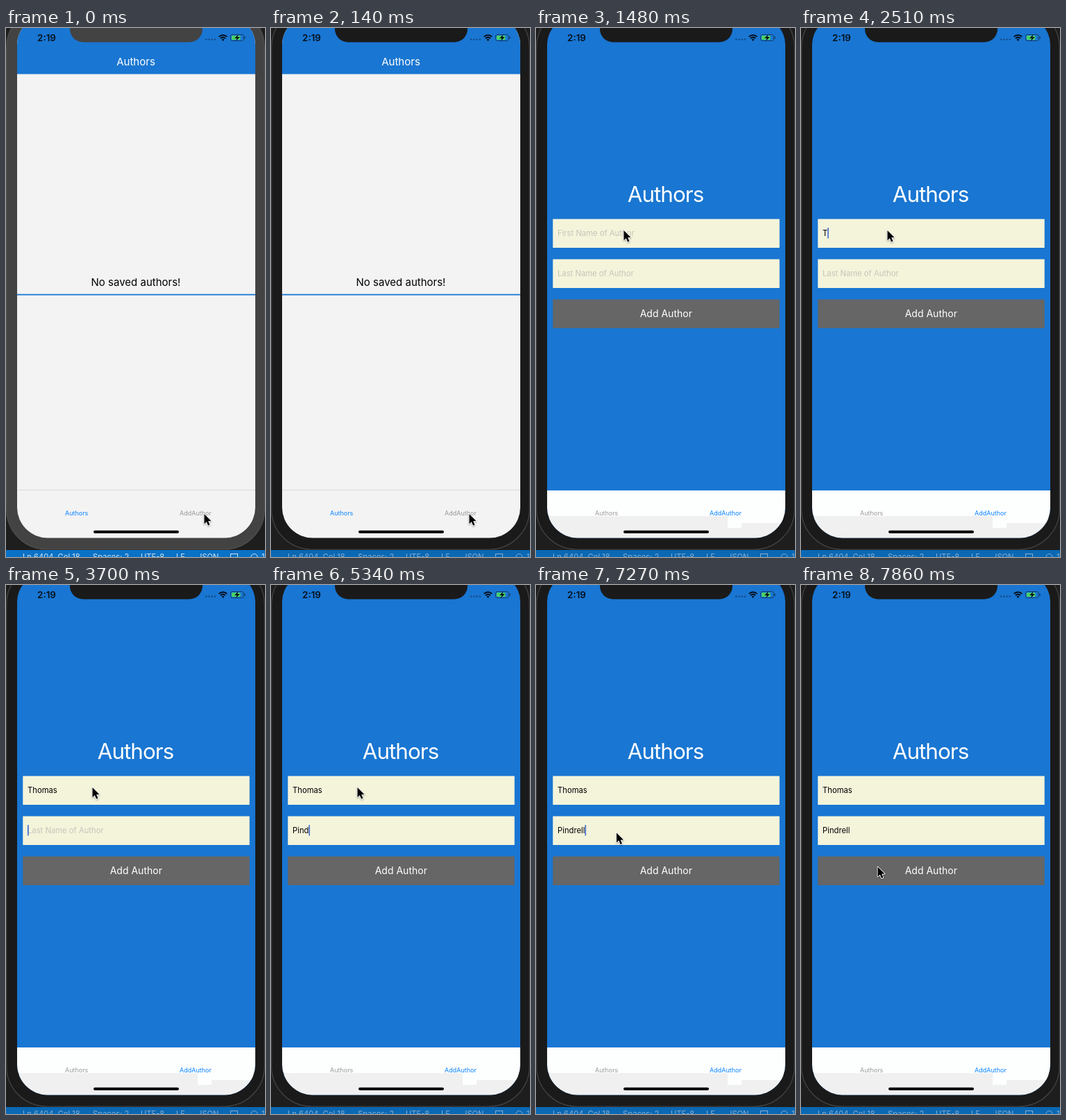
An HTML page with a canvas for the animation above (8000 ms loop, 373x763 px).

```html
<!DOCTYPE html>
<html lang="en">
<head>
<meta charset="utf-8">
<title>Authors app</title>
<style>
  html, body { margin: 0; width: 100%; height: 100%; overflow: hidden; background: #1e1e1e; }
  canvas { display: block; width: 373px; height: 763px; }
</style>
</head>
<body>
<canvas id="stage"></canvas>
<script>
const W = 373, H = 763, LOOP = 8000, TICK = 148.4;
const BLUE = '#1976d2', LINK = '#0a84ff', PAPER = '#f3f3f3';
const FAMILY = 'Inter, "Open Sans", sans-serif';

const canvas = document.getElementById('stage');
const ctx = canvas.getContext('2d');
const dpr = window.devicePixelRatio || 1;
canvas.width = W * dpr;
canvas.height = H * dpr;

const FIRST = { text: 'Thomas', hint: 'First Name of Author', top: 275.5, keys: [2510, 2810, 2960, 3110, 3250, 3400] };
const LAST = { text: 'Pindrell', hint: 'Last Name of Author', top: 333.5, keys: [4150, 4600, 4740, 5340, 5490, 5790, 5940, 6080] };

// Pointer stops: time, x, y
const STOPS = [
  [0, 285, 700.5], [290, 285, 700.5], [1180, 147, 319], [1340, 147, 319], [1480, 126, 291.5],
  [1620, 124, 291.5], [6680, 124, 291.5], [7720, 110, 399], [7860, 110, 406], [LOOP, 110, 406]
];

function rect(x, y, w, h, color) {
  ctx.fillStyle = color;
  ctx.fillRect(x, y, w, h);
}

function rounded(x, y, w, h, r) {
  ctx.beginPath();
  ctx.roundRect(x, y, w, h, r);
}

function label(text, x, y, size, color, { align = 'center', weight = 400, spacing = 0 } = {}) {
  ctx.font = `${weight} ${size}px ${FAMILY}`;
  ctx.letterSpacing = `${spacing}px`;
  ctx.textAlign = align;
  ctx.fillStyle = color;
  ctx.fillText(text, x, y);
  const width = ctx.measureText(text).width;
  ctx.letterSpacing = '0px';
  return width;
}

function drawEditorBar(focused) {
  rect(0, 0, W, H, '#1e1e1e');
  rect(0, 753, W, 10, focused ? '#0a68b4' : '#0972c6');
  const ink = focused ? '#86add0' : '#d3e4f3';
  const items = [['Ln 6404, Col 18', 24], ['Spaces: 2', 125], ['UTF-8', 194], ['LF', 245], ['JSON', 276], ['1', 368]];
  for (const [text, x] of items) label(text, x, 766.5, 11.2, ink, { align: 'left' });
  ctx.strokeStyle = ink;
  ctx.lineWidth = 1;
  ctx.strokeRect(323.5, 758.5, 10, 8);
  ctx.beginPath();
  ctx.arc(357.5, 763, 4.5, Math.PI, 0);
  ctx.stroke();
}

function drawShell(color, edge) {
  rounded(0.7, -30, W - 1.4, 782, 58);
  ctx.fillStyle = color;
  ctx.fill();
  ctx.strokeStyle = edge;
  ctx.lineWidth = 1.2;
  ctx.stroke();
}

function drawNotch(color) {
  rounded(92, -30, 191, 50.5, [0, 0, 19, 19]);
  ctx.fillStyle = color;
  ctx.fill();
}

function drawStatus() {
  label('2:19', 58.5, 19, 13.4, '#06101c', { weight: 600 });
  ctx.fillStyle = '#124f8f';
  for (let i = 0; i < 4; i++) {
    ctx.beginPath();
    ctx.arc(288.3 + i * 4.2, 16.5, 1.3, 0, 7);
    ctx.fill();
  }

  // Wi-Fi fan
  ctx.strokeStyle = ctx.fillStyle = '#050b14';
  ctx.lineWidth = 1.9;
  for (const r of [8.2, 5]) {
    ctx.beginPath();
    ctx.arc(312.5, 18.5, r, -Math.PI * 0.75, -Math.PI * 0.25);
    ctx.stroke();
  }
  ctx.beginPath();
  ctx.moveTo(312.5, 19);
  ctx.arc(312.5, 18.5, 2.7, -Math.PI * 0.75, -Math.PI * 0.25);
  ctx.fill();

  // Battery with bolt
  rounded(323.5, 9.5, 18.8, 9, 2.4);
  ctx.strokeStyle = '#12406f';
  ctx.lineWidth = 1;
  ctx.stroke();
  rounded(325, 11, 12.5, 6, 1.2);
  ctx.fillStyle = '#4cd266';
  ctx.fill();
  rect(343.4, 12.2, 1.3, 3.6, '#12406f');
  polygon([[334.6, 9.2], [329, 14.7], [332.3, 14.7], [331, 18.8], [336.8, 13.1], [333.4, 13.1]]);
  ctx.fillStyle = '#06101c';
  ctx.fill();
}

function polygon(points) {
  ctx.beginPath();
  for (const [x, y] of points) ctx.lineTo(x, y);
  ctx.closePath();
}

function drawTabs(onList) {
  const grey = '#989898';
  label('Authors', 101.7, 703, 9, onList ? LINK : grey);
  label('AddAuthor', 273, 703, 9, onList ? grey : LINK);
  rounded(126, 724.7, 123, 4, 2);
  ctx.fillStyle = '#000';
  ctx.fill();
}

function drawList() {
  rect(0, 0, W, H, PAPER);
  rect(0, 0, W, 66.5, BLUE);
  label('Authors', 187, 54, 15.05, '#fff');
  label('No saved authors!', 187, 372, 15, '#000');
  rect(16, 383.7, 343, 1.8, BLUE);
  rect(16, 666, 343, 1, '#d9d9d9');
}

function drawField(field, t, caret) {
  rect(24.3, field.top, 326.4, 41.5, '#f4f4db');
  const base = field.top + 24.5;
  const typed = field.text.slice(0, field.keys.filter(k => t >= k).length);
  const style = { align: 'left' };
  let width = 0;
  if (typed) width = label(typed, 31, base, 11.25, '#000', style);
  else label(field.hint, 31, base, 11.25, '#c5c5bb', style);
  if (caret) rect(31 + width, field.top + 12.5, 1.6, 15.5, '#426bd2');
}

function drawForm(t) {
  rect(0, 0, W, H, BLUE);
  label('Authors', 186.5, 251, 31.4, '#fff', { spacing: -0.94 });
  const blink = t >= 6830 && t < 7270;
  drawField(FIRST, t, t >= 1920 && t < 3700);
  drawField(LAST, t, t >= 3700 && t < 7860 && !blink);
  rect(24.3, 391.5, 326.4, 41.5, '#666');
  label('Add Author', 187.3, 417, 14, '#fff');

  // Tab bar with its uneven lower edge
  rect(0, 667, W, 37, '#fdfefe');
  rect(0, 704, W, 40, '#f0f0f0');
  if (t >= 590) {
    rect(276, 704, 83, 10, '#fdfefe');
    rect(276, 704, 20, 17, '#fdfefe');
  }
}

function pointerAt(t) {
  let i = 0;
  while (i < STOPS.length - 2 && t >= STOPS[i + 1][0]) i++;
  const [t0, x0, y0] = STOPS[i], [t1, x1, y1] = STOPS[i + 1];
  const u = Math.min(1, (t - t0) / (t1 - t0));
  const k = u * u * (3 - 2 * u);
  return [x0 + (x1 - x0) * k, y0 + (y1 - y0) * k];
}

function drawPointer(x, y) {
  ctx.save();
  ctx.translate(x + 0.5, y + 0.5);
  polygon([[0, 0], [0, 14.2], [3.3, 11.2], [5.6, 16.6], [8, 15.6], [5.7, 10.3], [10, 10.1]]);
  ctx.lineJoin = 'round';
  ctx.lineWidth = 1.7;
  ctx.strokeStyle = '#fff';
  ctx.shadowColor = 'rgba(0,0,0,.35)';
  ctx.shadowBlur = 2 * dpr;
  ctx.shadowOffsetY = dpr;
  ctx.stroke();
  ctx.shadowColor = 'transparent';
  ctx.fillStyle = '#000';
  ctx.fill();
  ctx.restore();
}

function draw(t) {
  const focused = t >= 140;
  const onList = t < 290;
  const shell = focused ? '#1a1a1a' : '#434343';
  ctx.setTransform(dpr, 0, 0, dpr, 0, 0);
  drawEditorBar(focused);
  drawShell(shell, focused ? '#454545' : '#515151');

  ctx.save();
  rounded(16, -16, 343, 751.5, [40, 40, 44, 44]);
  ctx.clip();
  if (onList) drawList();
  else drawForm(t);
  drawTabs(onList);
  drawStatus();
  ctx.restore();

  drawNotch(shell);
  const tick = Math.floor((t + 13) / TICK) * TICK;
  drawPointer(...pointerAt(tick + 4));
}

const start = performance.now();
function loop() {
  draw((performance.now() - start) % LOOP);
  requestAnimationFrame(loop);
}
loop();
</script>
</body>
</html>
```
